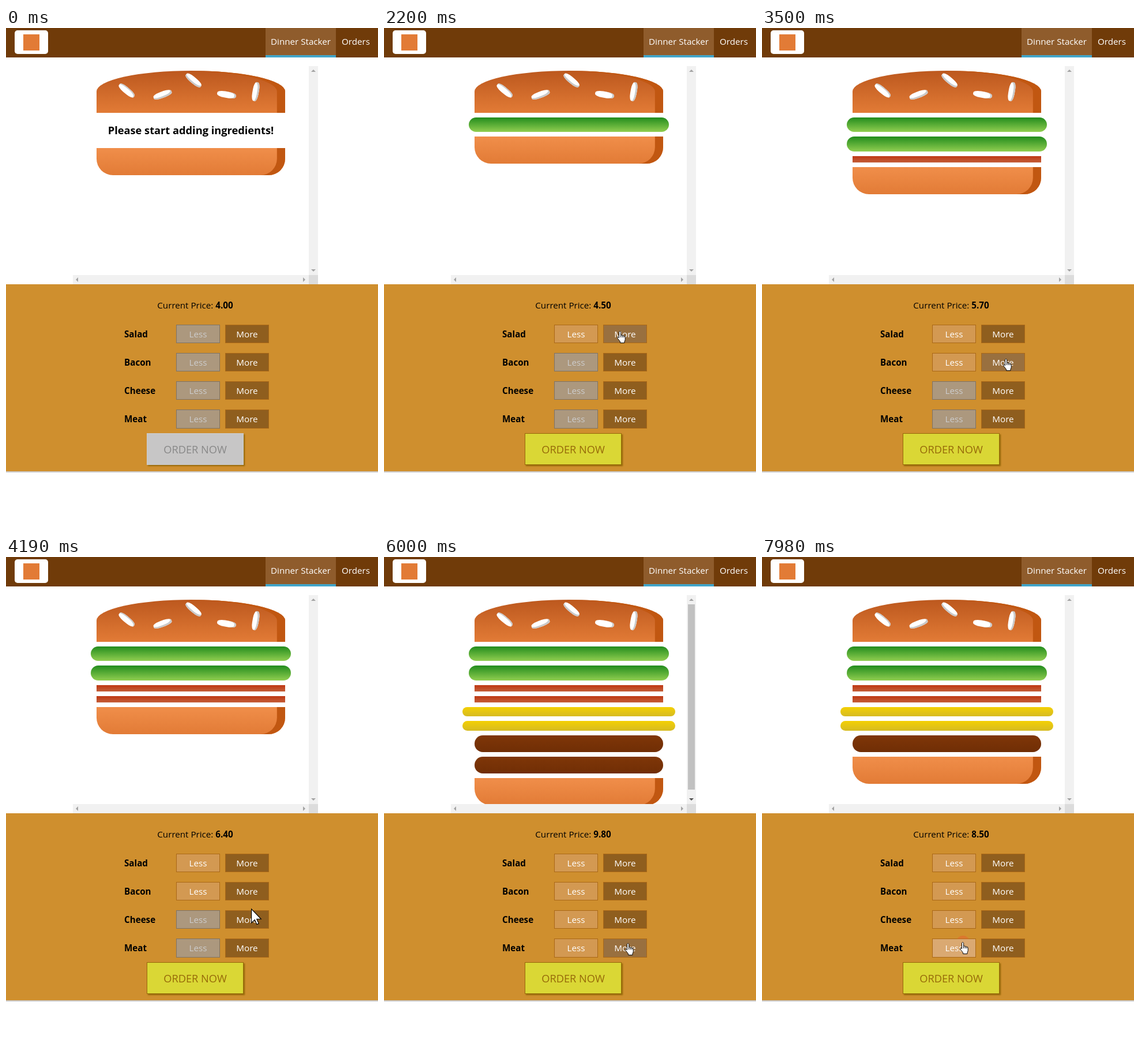
Animation of 645x868 px, one loop 8 s. Source, as an HTML page:

```html
<!DOCTYPE html>
<html lang="en">
<head>
<meta charset="utf-8">
<title>Dinner Stacker</title>
<style>
html, body { margin: 0; width: 100%; height: 100%; overflow: hidden; background: #fff; }
body { position: relative; font: 15.2px/20.7px "Open Sans", sans-serif; color: #000; }
body > *, .panel > * { position: absolute; box-sizing: border-box; }
header { left: 0; top: 0; width: 645px; height: 51px; background: #703b09; }
header * { position: absolute; box-sizing: border-box; }
.tile { left: 15px; top: 4px; width: 58px; height: 41px; border-radius: 5px; background: #fff; }
.logo { left: 15px; top: 6.5px; width: 28px; height: 28px; background: #e27b36; }
nav span { top: 0; height: 51px; line-height: 47px; color: #fff; text-align: center; white-space: nowrap; }
nav .on { left: 450px; width: 122px; background: #8f5c2c; border-bottom: 4px solid #40a4c8; }
nav .off { left: 572px; width: 69px; }

#burger { left: 116px; top: 66px; width: 409px; height: 362px; overflow: hidden; }
#burger > div { box-sizing: border-box; margin: 2% auto; }
#burger p { margin: 18.24px 0; font: bold 18.24px/24.8px "Open Sans", sans-serif; text-align: center; }
.top { position: relative; width: 80%; height: 20%; background: linear-gradient(#bc581e, #e27b36); border-radius: 50% 50% 0 0; box-shadow: inset -14.2px 0 #c15711; }
.bottom { width: 80%; height: 13%; background: linear-gradient(#f08e4a, #e27b36); border-radius: 0 0 28.5px 28.5px; box-shadow: inset -14.2px 0 #c15711; }
.salad { width: 85%; height: 7%; background: linear-gradient(#228c1d, #91ce50); border-radius: 19px; }
.bacon { width: 80%; height: 3%; background: linear-gradient(#bf3813, #c45e38); }
.cheese { width: 90%; height: 4.5%; background: linear-gradient(#f4d004, #d6bb22); border-radius: 19px; }
.meat { width: 80%; height: 8%; background: linear-gradient(#7f3608, #702e05); border-radius: 14.2px; }
.seed, .seed::before, .seed::after { position: absolute; width: 10%; height: 15%; top: 50%; background: #fff; border-radius: 40%; }
.seed::before, .seed::after { width: 100%; height: 100%; }
.s1 { left: 30%; transform: rotate(-20deg); box-shadow: inset -2px -3px #c9c9c9; }
.s1::after { content: ""; left: -170%; top: -260%; transform: rotate(60deg); box-shadow: inset -1px 2px #c9c9c9; }
.s1::before { content: ""; left: 180%; top: -50%; transform: rotate(60deg); box-shadow: inset -1px -3px #c9c9c9; }
.s2 { left: 64%; transform: rotate(10deg); box-shadow: inset -3px 0 #c9c9c9; }
.s2::before { content: ""; left: 150%; top: -130%; transform: rotate(90deg); box-shadow: inset 1px 3px #c9c9c9; }

.bars { left: 116px; top: 66px; }
.panel { left: 0; top: 444px; width: 645px; height: 323.5px; background: #cf8f2e; box-shadow: 0 2px 1px #ccc; }
.price { left: 0; width: 656px; top: 25.5px; text-align: center; }
.name { left: 205px; font-weight: bold; }
.btn { width: 76px; height: 32.5px; line-height: 30.5px; border: 1px solid #aa6817; color: #fff; text-align: center; }
.less { left: 295px; background: #d39952; }
.more { left: 380px; background: #8f5e1e; }
.less.hot { background: #daa972; }
.more.hot { background: #99703f; }
.less.idle { background: #ac987e; border-color: #7e7365; color: #ccc; }
#order { left: 244px; top: 257.5px; width: 168px; height: 55.5px; line-height: 54px; font-size: 18.24px; text-align: center; background: #dad735; border: 1px solid #966909; color: #966909; box-shadow: 2px 2px 2px #966909; }
#order.idle { background: #c7c6c6; border-color: #ccc; color: #888; }
#ring { left: -11.5px; top: -11.5px; width: 23px; height: 23px; border-radius: 50%; background: #e8622f; opacity: .5; }
#arrow, #hand { left: 0; top: 0; overflow: visible; }
</style>
</head>
<body>
<header>
  <div class="tile"><div class="logo"></div></div>
  <nav><span class="on">Dinner Stacker</span><span class="off">Orders</span></nav>
</header>
<div id="burger"></div>
<svg class="bars" width="425" height="378" fill="#a3a3a3">
  <path fill="#f1f1f1" d="M409 0h16v362h-16zM0 362h409v16H0z"/>
  <path fill="#dcdcdc" d="M409 362h16v16h-16z"/>
  <path id="thumb" fill="#c1c1c1" d="M411 16h12v321h-12z"/>
  <path d="M413 10h8l-4-4zM9 366v8l-4-4zM399 366v8l4-4z"/>
  <path id="down" d="M413 352h8l-4 4z"/>
</svg>
<div class="panel">
  <div class="price">Current Price: <b id="price"></b></div>
  <div id="order">ORDER NOW</div>
</div>
<div id="ring"></div>
<svg id="arrow" width="18" height="29"><path transform="scale(1.45)" d="M.4.6v16.6l3.9-3.7 2.5 5.5 2.3-1-2.4-5.4h5.2z" fill="#fff" stroke="#000" stroke-width=".8"/></svg>
<svg id="hand" width="15" height="22"><g fill="#fff" stroke="#000">
  <path d="M5 .6c1 0 1.6.7 1.6 1.6v5.3c.5-.9 2.6-.6 2.7.6.6-.8 2.5-.5 2.6.8.8-.6 2.3-.1 2.3 1.3v4.3c0 2-1.3 3-1.3 4.4v1.7H5.6v-1.6c0-1.4-4.3-5.2-5-7.2-.4-1.4 1.4-1.9 2.3-.9l.6.9V2.2C3.5 1.3 4 .6 5 .6z"/>
  <path fill="none" d="M6.6 7.5v3.6M9.3 8.1v3M11.9 8.9v2.4"/>
</g></svg>
<script>
const $ = id => document.getElementById(id);
const LOOP = 8000, ROW_TOP = 513.5, ROW_STEP = 49.2;
const items = [['Salad', .5], ['Bacon', .7], ['Cheese', .4], ['Meat', 1.3]];

// press, release, row, change
const clicks = [
  [1990, 2100, 0, 1], [2670, 2790, 0, 1], [3200, 3300, 1, 1], [3750, 3860, 1, 1], [4350, 4460, 2, 1],
  [4810, 4910, 2, 1], [5330, 5440, 3, 1], [5870, 6000, 3, 1], [7900, 7980, 3, -1]
];

// time, x, y of the pointer
const path = [
  [310, 608, 890], [480, 598, 790], [700, 574, 690], [920, 540, 608], [1130, 498, 517], [1260, 482, 502],
  [1420, 452, 495], [1600, 422, 504], [1800, 410, 520], [1940, 409, 525], [2830, 409, 525],
  [3180, 421, 573], [3480, 421, 573], [3500, 423, 573], [3900, 423, 573], [4310, 425, 618],
  [4950, 425, 618], [5300, 423, 669], [6570, 423, 669], [6850, 390, 671], [7130, 350, 668],
  [7350, 350, 668], [7470, 348, 667], [8000, 348, 667]
];

const add = (cls, text, y) => {
  const el = document.createElement('div');
  el.className = cls;
  el.textContent = text;
  el.style.top = y - 444 + 'px';
  document.querySelector('.panel').append(el);
  return el;
};
const rows = items.map(([name], i) => {
  const y = ROW_TOP + i * ROW_STEP;
  add('name', name, y + 6);
  return { y, less: add('btn less', 'Less', y), more: add('btn more', 'More', y) };
});

// Hermite curve that comes to rest wherever the pointer pauses
function slope(i, k) {
  const a = path[i - 1], b = path[i], c = path[i + 1];
  const still = (p, q) => p[1] === q[1] && p[2] === q[2];
  if (!a || !c || still(a, b) || still(b, c)) return 0;
  return (c[k] - a[k]) / (c[0] - a[0]);
}
function pointer(t) {
  if (t < path[0][0]) return path[0].slice(1);
  const i = path.findIndex((p, n) => n === path.length - 1 || path[n + 1][0] > t);
  const p = path[i], q = path[i + 1];
  if (!q) return p.slice(1);
  const d = q[0] - p[0], u = (t - p[0]) / d, v = 1 - u;
  return [1, 2].map(k => v * v * (1 + 2 * u) * p[k] + u * u * (3 - 2 * u) * q[k]
    + d * u * v * (v * slope(i, k) - u * slope(i + 1, k)));
}

let shown = '';
function stack(counts) {
  const key = counts.join();
  if (key === shown) return;
  shown = key;
  const fill = items.map(([name], i) => `<div class="${name.toLowerCase()}"></div>`.repeat(counts[i])).join('');
  $('burger').innerHTML = '<div class="top"><i class="seed s1"></i><i class="seed s2"></i></div>'
    + (fill || '<p>Please start adding ingredients!</p>') + '<div class="bottom"></div>';
  $('price').textContent = items.reduce((sum, [, cost], i) => sum + cost * counts[i], 4).toFixed(2);
  $('order').className = fill ? '' : 'idle';
  rows.forEach((r, i) => r.less.classList.toggle('idle', !counts[i]));
  const tall = counts[3] > 1;
  $('thumb').style.display = tall ? '' : 'none';
  $('down').style.fill = tall ? '#505050' : '';
}

function draw(t) {
  const counts = [0, 0, 0, 0];
  for (const [, up, row, n] of clicks) if (t >= up) counts[row] += n;
  stack(counts);

  const [x, y] = pointer(t);
  let over = false;
  rows.forEach((r, i) => {
    const inRow = y >= r.y && y < r.y + 32.5;
    const less = inRow && x >= 295 && x < 371 && counts[i] > 0;
    const more = inRow && x >= 380 && x < 456;
    r.less.classList.toggle('hot', less);
    r.more.classList.toggle('hot', more);
    over = over || less || more;
  });
  const move = (id, dx, dy, on) => {
    $(id).style.transform = `translate(${Math.round(x) + dx}px, ${Math.round(y) + dy}px)`;
    $(id).style.visibility = on ? 'visible' : 'hidden';
  };
  move('arrow', 0, 0, !over);
  move('hand', -5, 0, over);
  const late = t >= 7980;
  move('ring', 0, 0, late || clicks.some(([down, up]) => t >= down && t < up));
  $('ring').style.clipPath = late ? 'inset(0 0 17px)' : '';
}

const start = performance.now();
function tick() {
  draw((performance.now() - start) % LOOP);
  requestAnimationFrame(tick);
}
tick();
</script>
</body>
</html>
```
